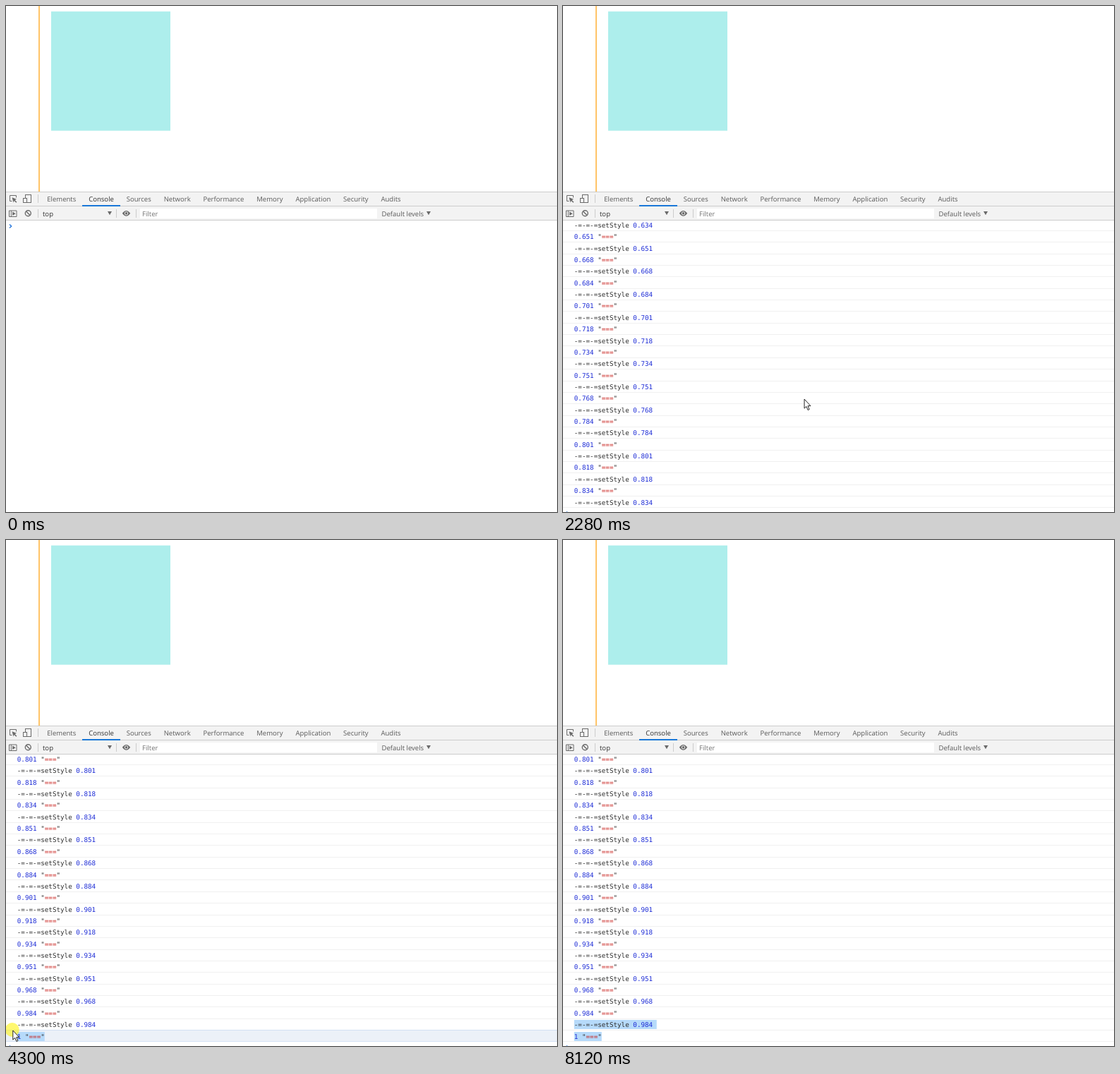
Write an HTML page that moves like this. It is 781 px wide and 717 px high and loops after 8.29 s.

```html
<!DOCTYPE html>
<html lang="en">
<head>
<meta charset="utf-8">
<title>Console log</title>
<style>
  html, body { margin: 0; width: 100%; height: 100%; overflow: hidden; background: #fff; }
  svg { display: block; width: 781px; height: 717px; }
  text { white-space: pre; text-rendering: geometricPrecision; }
  .ui text { font: 9.55px "Open Sans", sans-serif; fill: #5a5a5a; }
  .ui .active { fill: #333; }
  .log text { font: 9.25px "DejaVu Sans Mono", monospace; fill: #303030; }
  .log .num { fill: #1c2bd6; }
  .log .str { fill: #c8201c; }
  .line { fill: #ccc; }
  .icon { fill: none; stroke: #6a6a6a; }
  .solid { fill: #6a6a6a; stroke: none; }
</style>
</head>
<body>
<svg viewBox="0 0 781 717">
  <rect x="46" width="2" height="263" fill="#ffc468"/>
  <rect x="64" y="7.7" width="169" height="169" fill="#adeeec"/>

  <g class="log" id="log"></g>

  <g class="ui">
    <rect y="263" width="781" height="41" fill="#f3f3f3"/>
    <path class="line" d="M0 263h781v1H0zM0 283h781v1H0zM0 303h781v1H0z"/>
    <path class="line" d="M45 267h1v12h-1zM45 288h1v12h-1zM156 288h1v12h-1zM184 288h1v12h-1z"/>
    <rect x="108" y="282" width="54" height="2" fill="#1a78d8"/>
    <rect x="190" y="287" width="336" height="14" fill="#fff"/>
    <text id="tabs" x="58.2" y="276.8"></text>
    <text class="active" x="52" y="297.9">top</text>
    <text x="193" y="297.9" style="fill:#757575">Filter</text>
    <text x="532.5" y="297.9">Default levels</text>
    <g class="icon">
      <path d="M14.5 271.5V268.5H5.5V276.5H8.5"/>
      <path class="solid" d="M8.5 271.2L15 273.8L12.7 275L15.4 277.7L14.3 278.8L11.6 276.1L10.6 278.4Z"/>
      <rect x="27.5" y="267.5" width="8" height="11"/>
      <rect x="24.5" y="272.5" width="5" height="6" fill="#f3f3f3"/>
      <path d="M4.5 290H15V298.5H4.5ZM7.3 290V298.5"/>
      <path class="solid" d="M9.2 291.4L13.6 294.2L9.2 297Z"/>
      <circle cx="31.3" cy="293.8" r="4" stroke-width="1.4"/>
      <path d="M28.5 291L34.1 296.6" stroke-width="1.4"/>
      <path class="solid" d="M164.8 293.8Q170.5 286 176.2 293.8Q170.5 301.6 164.8 293.8Z"/>
      <circle cx="170.5" cy="293.8" r="2.2" stroke="#f3f3f3" fill="#6a6a6a"/>
      <path class="solid" d="M144 291H150L147 296.2ZM596 291H602L599 296.2Z"/>
    </g>
  </g>

  <g id="pointer">
    <circle id="press" cx="-.5" cy="-.5" r="10" fill="#fff200" fill-opacity=".56"/>
    <path d="M.5 .5V13.6L3.4 10.9L5.6 16L7.6 15.1L5.5 10.1H9.4Z" fill="#fff" stroke="#222"/>
  </g>
</svg>
<script>
const LOOP = 8290, REFRESH = 76.5, LOG_START = 1420;
const PITCH = 16.357, VISIBLE = 25, CHAR = 5.57, LEFT = 15.8;

// Pointer key points: time, x, y
const path = [
  [0, 780, 736], [1420, 780, 736], [1880, 195.5, 528], [2430, 400, 568], [2740, 400, 568],
  [2980, 215, 684.5], [3540, 132, 703], [4300, 9.3, 694.5], [4600, 9.3, 685], [4830, 9.3, 685],
  [5400, 145, 688], [5700, 145, 688], [6540, 15, 689], [6790, 15, 689], [7360, 500, 720]
];

const $ = id => document.getElementById(id);
const within = (t, a, b) => t >= a && t < b;
const rect = (x, y, w, h, fill) =>
  `<rect x="${x}" y="${y}" width="${w}" height="${h}" fill="${fill}"/>`;

$("tabs").innerHTML =
  "Elements Console Sources Network Performance Memory Application Security Audits".split(" ")
    .map((name, i) => `<tspan dx="${i ? 17.85 : 0}"${i === 1 ? ' class="active"' : ""}>${name}</tspan>`)
    .join("");

// The pointer moves in equal hops, one per screen refresh
function pointerAt(t) {
  const i = path.findIndex(p => p[0] > t);
  if (i < 0) return path[path.length - 1].slice(1);
  const [t0, x0, y0] = path[i - 1], [t1, x1, y1] = path[i];
  const hops = Math.round((t1 - t0) / REFRESH);
  const f = Math.floor((t - t0) / (t1 - t0) * hops) / hops;
  return [x0 + (x1 - x0) * f, y0 + (y1 - y0) * f];
}

// Two messages per animation frame, until the progress reaches 1
function messageCount(t) {
  if (t < LOG_START) return 0;
  const seen = Math.floor((t - LOG_START) / REFRESH) * REFRESH;
  return Math.min(121, 2 * Math.floor((seen + 8) * 60 / 1000) + 2);
}

function message(index) {
  const value = Math.min(1, +((index >> 1) / 60 + .001).toFixed(3));
  const num = `<tspan class="num">${value}</tspan>`;
  return index % 2 ? `-=-=-=setStyle ${num}` : `${num} "<tspan class="str">===</tspan>"`;
}

function select(from, to, y) {
  return rect(LEFT + from * CHAR, y + 3, (to - from) * CHAR, 13, "#b6dafa");
}

function logMarkup(t, x) {
  const count = messageCount(t), shown = Math.min(count, VISIBLE);
  const top = count < VISIBLE ? 304 : 302.07;
  const focus = within(t, 3540, 5470) ? 24 : within(t, 5470, 8120) ? 23 : -1;
  const dragged = t < 4300 ? Math.min(7, Math.max(0, Math.round((x - LEFT) / CHAR))) : 0;
  let html = "";
  for (let i = 0; i < shown; i++) {
    const y = top + i * PITCH, y0 = Math.floor(y), y1 = Math.floor(y + PITCH);
    const border = i === focus ? "#d3e1f4" : "#f0f0f0";
    if (i === focus) html += rect(0, y0, 781, y1 - y0, "#ecf1f8") + rect(0, y0, 781, 1, border);
    html += rect(0, y1, 781, 1, border);
    if (i === 23 && t >= 4830) html += select(0, 21, y0 - 1);
    if (i === 24 && t >= 3620) html += select(dragged, 7, y0);
    html += `<text x="${LEFT}" y="${y + 11.9}">${message(count - shown + i)}</text>`;
  }
  const y = top + shown * PITCH + 8;
  return html +
    `<path d="M5 ${y - 2.6}l2.7 2.6l-2.7 2.6" fill="none" stroke="#2a78dc" stroke-width="1.4"/>`;
}

const begin = performance.now();
let last = "";
function tick() {
  const t = (performance.now() - begin) % LOOP;
  const [x, y] = pointerAt(t);
  const html = logMarkup(t, x);
  if (html !== last) $("log").innerHTML = last = html;
  $("pointer").setAttribute("transform", `translate(${x} ${y})`);
  const pressed = within(t, 3540, 4830) || within(t, 5400, 6710);
  $("press").style.display = pressed ? "" : "none";
  requestAnimationFrame(tick);
}
tick();
</script>
</body>
</html>
```
